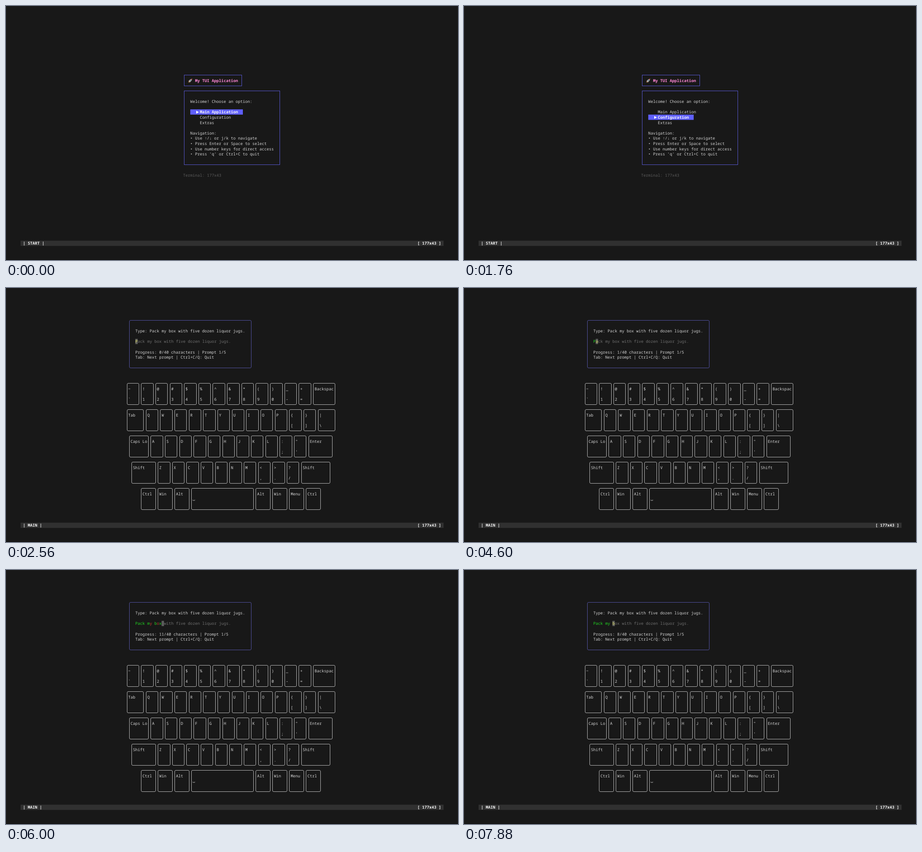
An HTML page that plays this animation: 998x561 px, repeating every 8 s.

```html
<!DOCTYPE html>
<html lang="en">
<head>
<meta charset="utf-8">
<title>Terminal typing trainer</title>
<style>
  html, body { margin: 0; width: 100%; height: 100%; overflow: hidden; background: #181818; }
  svg { display: block; width: 998px; height: 561px; }
  text {
    font: 8.795px "Noto Sans Mono", "DejaVu Sans Mono", monospace;
    fill: #d4d4d4; white-space: pre; text-rendering: geometricPrecision;
  }
  .bold { font-weight: 700; }
  .white { fill: #f4f4f4; }
  .pink { fill: #ff87d7; }
  .dim { fill: #5c5c5c; }
  .frame { fill: none; stroke: #5656cc; }
  .panel { fill: none; stroke: #5151a0; }
  .key { fill: none; stroke: #b4b4b4; }
  .select { fill: #5f5fff; }
  .todo { fill: #707070; }
  .good { fill: #22dc22; font-weight: 500; }
  .bad { fill: #c83c32; }
  .at { fill: #dede62; }
</style>
</head>
<body>
<svg id="stage" viewBox="0 0 998 561">
  <rect width="998" height="561" fill="#181818"/>
  <rect y="560" width="998" height="1" fill="#0b0b0b"/>
  <g id="bar"></g>
  <g id="menu">
    <g transform="translate(407 164.7) rotate(45)">
      <path d="M-1.6 2 L-3.2 4.2 L-1.2 3.6 Z M1.6 2 L3.2 4.2 L1.2 3.6 Z" fill="#b5403a"/>
      <path d="M-.9 3.6 L0 6.6 L.9 3.6 Z" fill="#e0963a"/>
      <path d="M0 -6 Q3.4 -1.5 1.5 3.7 H-1.5 Q-3.4 -1.5 0 -6 Z" fill="#a9b0b2"/>
      <path d="M0 -6 Q1.2 -4.6 1.6 -3.2 H-1.6 Q-1.2 -4.6 0 -6 Z" fill="#b5403a"/>
      <circle cy="-.9" r="1.1" fill="#46606e"/>
    </g>
  </g>
  <g id="main"></g>
</svg>
<script>
const LOOP = 8000;
const CELL_W = 5.277, CELL_H = 11.6, LEFT = 32.2, TOP = 31.1;
const colX = c => LEFT + c * CELL_W;
const rowY = r => TOP + r * CELL_H;
const snap = v => Math.floor(v) + 0.5;
const [bar, menu, main] = ['bar', 'menu', 'main'].map(id => document.getElementById(id));

function add(parent, tag, attrs, content = '') {
  const el = document.createElementNS('http://www.w3.org/2000/svg', tag);
  for (const name in attrs) el.setAttribute(name, attrs[name]);
  el.textContent = content;
  parent.append(el);
  return el;
}

const write = (parent, col, row, content, cls = '') =>
  add(parent, 'text', { x: colX(col), y: rowY(row) + 9, class: cls }, content);

const fill = (parent, col, row, cols, attrs) =>
  add(parent, 'rect', { x: colX(col), y: rowY(row), width: cols * CELL_W, height: CELL_H, ...attrs });

// A border line runs through the middle of its cells.
function box(parent, col, row, cols, rows, cls, rx = 0) {
  const x = snap(colX(col + 0.5)), y = snap(rowY(row + 0.5));
  add(parent, 'rect', {
    x, y, rx, class: cls,
    width: snap(colX(col + cols - 0.5)) - x,
    height: snap(rowY(row + rows - 0.5)) - y
  });
}

// Status bar
fill(bar, 0, 42, 177, { fill: '#303030' });
const mode = write(bar, 1, 42, '', 'bold white');
write(bar, 166, 42, '[ 177x43 ]', 'bold white');

// Start menu
box(menu, 68, 10, 25, 3, 'frame');
write(menu, 73, 11, 'My TUI Application', 'bold pink');
box(menu, 68, 13, 41, 15, 'frame');
write(menu, 71, 15, 'Welcome! Choose an option:');
const highlight = fill(menu, 71, 17, 22, { class: 'select' });
const arrow = add(menu, 'path', { d: 'M420 231.3 L426 234.5 L420 237.7 Z', fill: '#fff' });
const options = ['Main Application', 'Configuration', 'Extras'];
const optionTexts = options.map((name, i) => write(menu, 75, 17 + i, name));
['Navigation:',
 '• Use ↑/↓ or j/k to navigate',
 '• Press Enter or Space to select',
 '• Use number keys for direct access',
 "• Press 'q' or Ctrl+C to quit"
].forEach((line, i) => write(menu, 71, 21 + i, line));
write(menu, 68, 29, 'Terminal: 177x43', 'dim');

// Typing panel
const prompt = 'Pack my box with five dozen liquor jugs.';
box(main, 45, 3, 52, 10, 'panel', 2.5);
write(main, 48, 5, 'Type: ' + prompt);
const cursor = fill(main, 48, 7, 1, { fill: '#5c5c5c' });
const letters = [...prompt].map((ch, i) => write(main, 48 + i, 7, ch));
const progress = write(main, 48, 9, '');
write(main, 48, 10, 'Tab: Next prompt | Ctrl+C/Q: Quit');

// Keyboard: "upper lower" on one key, "label:columns" for wide keys
const keyRows = [
  [44, '~` !1 @2 #3 $4 %5 ^6 &7 *8 (9 )0 _- += Backspac:10'],
  [44, 'Tab:8 Q W E R T Y U I O P {[ }] |\\:8'],
  [45, 'Caps_Lo:9 A S D F G H J K L :; "\' Enter:11'],
  [46, 'Shift:11 Z X C V B N M <, >. ?/ Shift:13'],
  [50, 'Ctrl:7 Win:7 Alt:7 Space:27 Alt:7 Win:7 Menu:7 Ctrl:7']
];
keyRows.forEach(([start, keys], i) => {
  const row = 15 + 5 * i;
  let col = start;
  for (const key of keys.split(' ')) {
    const [, label, size] = key.match(/^(.+?)(?::(\d+))?$/);
    const cols = Number(size || 6);
    box(main, col, row, cols, 5, 'key', 2.5);
    if (label === 'Space') {
      add(main, 'path', {
        d: `M${colX(col + 1) + 0.6} ${rowY(row + 2) + 7.2} v1.8 h4 v-1.8`,
        fill: 'none', stroke: '#c4c4c4', 'stroke-width': 0.8
      });
    } else if (label.length === 2) {
      write(main, col + 1, row + 1, label[0]);
      write(main, col + 1, row + 3, label[1]);
    } else {
      write(main, col + 1, row + 1, label.replace('_', ' '));
    }
    col += cols;
  }
});

// [time, value] steps
const selections = [[0, 0], [1480, 1], [1600, 2], [1760, 1], [1920, 0]];
const MAIN_AT = 2560, RETYPE_AT = 7600;
const typos = [6, 9];
const typed = [
  [0, 0], [4600, 1], [4720, 2], [4880, 3], [5000, 4], [5160, 5], [5280, 6],
  [5440, 7], [5600, 8], [5720, 9], [5880, 10], [6000, 11], [6160, 12],
  [6280, 13], [6440, 14], [6600, 13], [6720, 12], [6880, 11], [7000, 10],
  [7160, 9], [7280, 8], [7440, 7], [7600, 6], [7720, 7], [7880, 8]
];
const valueAt = (steps, t) => steps.findLast(([time]) => time <= t)[1];

function drawMenu(t) {
  const selected = valueAt(selections, t);
  highlight.setAttribute('y', rowY(17 + selected));
  highlight.setAttribute('width', (options[selected].length + 6) * CELL_W);
  arrow.setAttribute('transform', `translate(0 ${selected * CELL_H})`);
  optionTexts.forEach((el, i) => el.setAttribute('class', i === selected ? 'bold white' : ''));
}

function drawMain(t) {
  const count = valueAt(typed, t);
  const letterClass = i =>
    i > count ? 'todo' : i === count ? 'at' :
    t < RETYPE_AT && typos.includes(i) ? 'bad' : 'good';
  letters.forEach((el, i) => el.setAttribute('class', letterClass(i)));
  cursor.setAttribute('x', colX(48 + count));
  progress.textContent = `Progress: ${count}/${prompt.length} characters | Prompt 1/5`;
}

function draw(t) {
  const inMain = t >= MAIN_AT;
  menu.style.display = inMain ? 'none' : '';
  main.style.display = inMain ? '' : 'none';
  mode.textContent = inMain ? '| MAIN |' : '| START |';
  (inMain ? drawMain : drawMenu)(t);
}

const begin = performance.now();
function tick() {
  draw((performance.now() - begin) % LOOP);
  requestAnimationFrame(tick);
}
tick();
</script>
</body>
</html>
```
